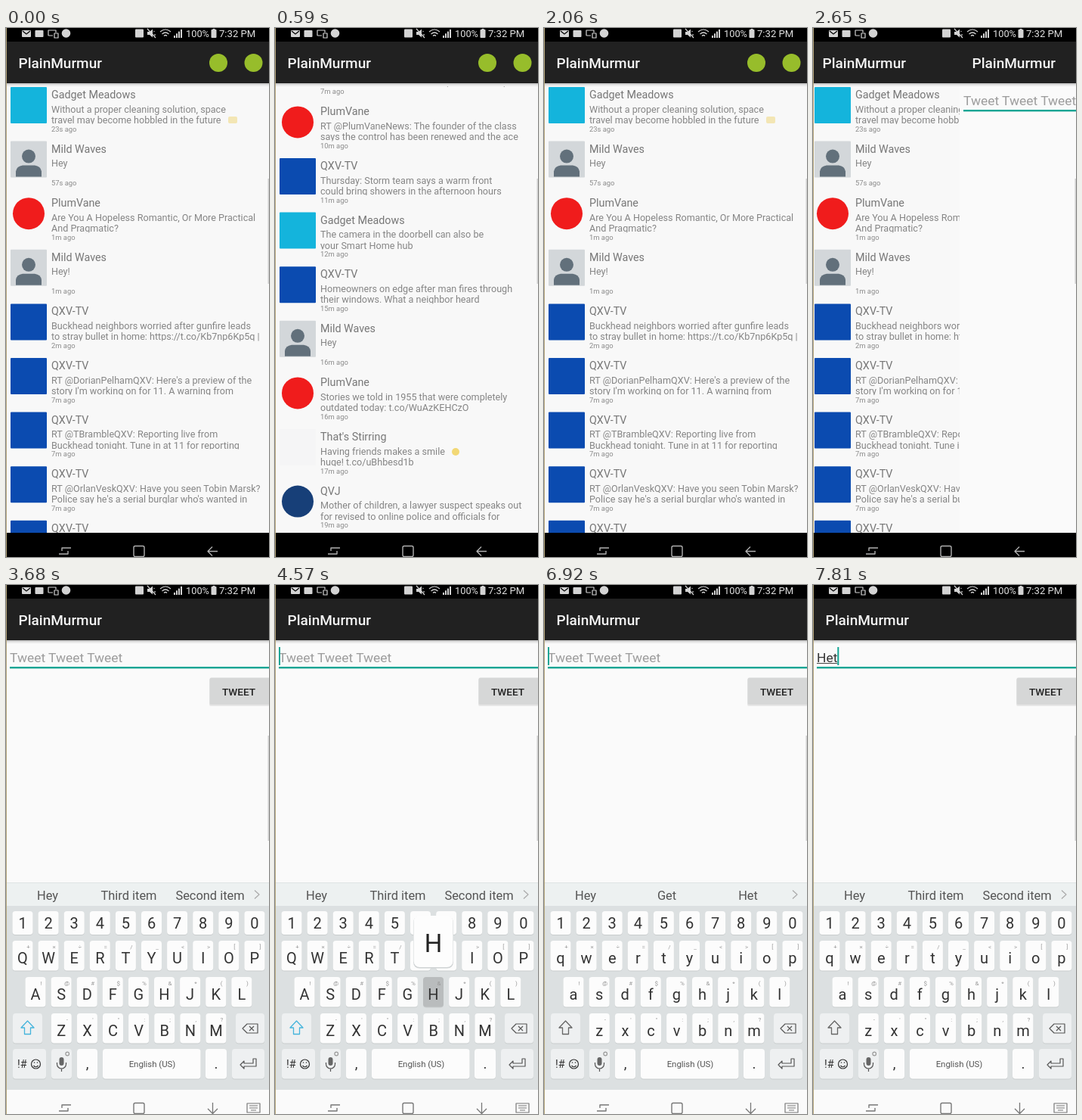
Animation, 348 px wide and 699 px high, one loop 8 s. Source, as an HTML page:

```html
<!DOCTYPE html>
<html lang="en">
<head>
<meta charset="utf-8">
<title>PlainMurmur</title>
<style>
html, body { margin: 0; width: 100%; height: 100%; overflow: hidden; background: #fafafa; }
svg { display: block; }
#stage { position: absolute; left: 0; top: 0; font-family: Roboto, sans-serif; }
</style>
</head>
<body>
<svg id="stage" width="348" height="699" viewBox="0 0 348 699"></svg>
<script>
const LOOP = 8000, STEP = 147.3, LAST = 53, PITCH = 71.6;
const TEAL = '#12a594';
const stage = document.getElementById('stage');
const pen = document.createElement('canvas').getContext('2d');
pen.font = '17.4px Roboto, sans-serif';

// Sparse tables of [step, value]; a value holds until the next entry.
const scroll = [[0, 0], [1, 60], [2, 210], [3, 420], [4, 622], [5, 740], [6, 690], [7, 450], [8, 170], [9, 0]];
const slide = [[0, 348], [17, 325], [18, 194], [19, 52], [20, 8], [21, 0]];
const listShift = [[0, 0], [18, -4], [19, -14], [20, -20]];
const keysDrop = [[0, 306], [22, 190], [23, 56], [24, 0]];
const typed = [[0, ''], [32, 'H'], [34, 'He'], [36, 'Het'], [43, 'He'], [44, 'H'], [45, ''], [51, 'H'], [52, 'He'], [53, 'Het']];
const pressed = [[0, ''], [31, 'h'], [32, ''], [33, 'e'], [34, ''], [35, 't'], [36, ''], [41, 'del'], [47, ''], [50, 'h'], [51, 'e'], [52, 't'], [53, '']];
const caps = [[0, true], [32, false], [48, true], [51, false]];
const cursorOn = [[0, false], [21, true], [25, false], [28, true], [41, false], [43, true]];
const hints = ['Hey', 'Third item', 'Second item'];
const words = [[0, hints], [37, ['Hey', 'Get', 'Het']], [48, hints]];

const at = (table, step) => table.filter(e => e[0] <= step).pop()[1];

// Feed accounts: name, avatar kind, avatar colour
const gadget = ['Gadget Meadows', 'square', '#14b4dc'];
const calm = ['Mild Waves', 'person', '#d3d7da'];
const plum = ['PlumVane', 'circle', '#f01c1c'];
const news = ['QXV-TV', 'square', '#0b4bb0'];
const stir = ["That's Stirring", 'square', '#f5f5f6'];
const paper = ['QVJ', 'circle', '#173f78'];
const feed = [
  [gadget, '23s', 'Without a proper cleaning solution, space', 'travel may become hobbled in the future'],
  [calm, '57s', 'Hey'],
  [plum, '1m', 'Are You A Hopeless Romantic, Or More Practical', 'And Pragmatic?'],
  [calm, '1m', 'Hey!'],
  [news, '2m', 'Buckhead neighbors worried after gunfire leads', 'to stray bullet in home: https://t.co/Kb7np6Kp5q |'],
  [news, '7m', "RT @DorianPelhamQXV: Here's a preview of the", "story I'm working on for 11.  A warning from"],
  [news, '7m', 'RT @TBrambleQXV: Reporting live from', 'Buckhead tonight. Tune in at 11 for reporting'],
  [news, '7m', 'RT @OrlanVeskQXV: Have you seen Tobin Marsk?', "Police say he's a serial burglar who's wanted in"],
  [news, '7m', 'Neighbors say the road will be closed until', 'crews can clear the lanes early this morning'],
  [plum, '10m', 'RT @PlumVaneNews: The founder of the class', 'says the control has been renewed and the ace'],
  [news, '11m', 'Thursday: Storm team says a warm front', 'could bring showers in the afternoon hours'],
  [gadget, '12m', 'The camera in the doorbell can also be', 'your Smart Home hub'],
  [news, '15m', 'Homeowners on edge after man fires through', 'their windows. What a neighbor heard'],
  [calm, '16m', 'Hey'],
  [plum, '16m', 'Stories we told in 1955 that were completely', 'outdated today: t.co/WuAzKEHCzO'],
  [stir, '17m', 'Having friends makes a smile', 'huge! t.co/uBhbesd1b'],
  [paper, '19m', 'Mother of children, a lawyer suspect speaks out', 'for revised to online police and officials for'],
  [news, '21m', 'Drivers warned about long delays downtown', 'as crews repair the bridge this weekend'],
  [calm, '22m', 'Hey'],
  [gadget, '24m', 'This tiny lamp charges from the window and', 'lasts all night long'],
  [news, '26m', 'Schools open late after the overnight rain', 'and fallen trees on several streets'],
];

const esc = s => s.replace(/&/g, '&amp;').replace(/</g, '&lt;');
const text = (x, y, size, fill, s, more = '') =>
  `<text x="${x}" y="${y}" font-size="${size}" fill="${fill}" ${more}>${esc(s)}</text>`;
const mid = (x, y, size, fill, s, more = '') => text(x, y, size, fill, s, 'text-anchor="middle" ' + more);
const rect = (x, y, w, h, fill, r = 0) =>
  `<rect x="${x}" y="${y}" width="${w}" height="${h}" rx="${r}" fill="${fill}"/>`;
const circle = (x, y, r, fill) => `<circle cx="${x}" cy="${y}" r="${r}" fill="${fill}"/>`;
const line = (d, color, w = 1.2) =>
  `<path d="${d}" fill="none" stroke="${color}" stroke-width="${w}" stroke-linejoin="round"/>`;
const fillPath = (d, color) => `<path d="${d}" fill="${color}"/>`;
const group = (x, y, s) => `<g transform="translate(${x} ${y})">${s}</g>`;

function avatar([, kind, color], y) {
  if (kind === 'circle') return circle(30, y + 24, 21, color);
  const base = rect(6, y, 48, 48, color, 1);
  if (kind === 'square') return base;
  const ink = '#62707b';
  return base + circle(30, y + 20, 9, ink) + fillPath(`M13 ${y + 47}v-7q1-7 9-8h16q8 1 9 8v7z`, ink);
}

function feedRow([who, age, first, second = ''], i) {
  const y = 78 + i * PITCH;
  const body = text(0, 13.5, 12.6, '#858585', first) + text(0, 28, 12.6, '#858585', second);
  const emoji = i === 0 ? rect(294, y + 39, 12, 9, '#f3e6b4', 2) : i === 15 ? circle(239, y + 30, 5, '#f2d875') : '';
  return avatar(who, y) + text(60, y + 15, 14.3, '#777', who[0]) +
    `<svg x="60" y="${y + 20}" width="277" height="29">${body}</svg>` + emoji +
    text(60, y + 58.5, 9.4, '#8a8a8a', age + ' ago');
}

const toolbar = () => rect(0, 18, 348, 55, '#212121') +
  rect(0, 73, 348, 2, '#cfcfcf') + rect(0, 75, 348, 2, '#ebebeb') +
  text(16.5, 53, 19, '#f5f5f5', 'PlainMurmur', 'font-weight="500"');

function listScreen(offset) {
  const rows = feed.map(feedRow).filter((_, i) => {
    const y = 78 + i * PITCH - offset;
    return y > 0 && y < 690;
  });
  return rect(0, 18, 348, 650, '#f8f8f8') + group(0, -offset, rows.join('')) + toolbar() +
    circle(281, 46, 12, '#97bd2b') + circle(327.5, 46, 12, '#97bd2b');
}

function composeScreen(value, showCursor) {
  const width = pen.measureText(value).width;
  const entry = value
    ? text(5, 101.5, 17.4, '#333', value) + rect(5, 103, width, 1, '#444')
    : text(5, 101.5, 17.4, '#9c9c9c', 'Tweet Tweet Tweet');
  return rect(0, 18, 348, 681, '#fafafa') + toolbar() + entry +
    rect(5, 108, 343, 2.4, TEAL) + (showCursor ? rect(5 + width, 82, 2, 24, TEAL) : '') +
    rect(269, 124, 80, 36, '#e6e6e6', 2) + rect(269.5, 122.5, 80, 35.5, '#d6d7d7', 2) +
    mid(308, 145.5, 13.6, '#222', 'TWEET', 'font-weight="500"');
}

const letterRows = [
  ['qwertyuiop', 22, 470, '+×÷=/_<>[]'],
  ['asdfghjkl', 39, 518, '!@#$%&*()'],
  ['zxcvbnm', 73.3, 566, '-\'":;,?'],
];

function keyboard(upper, down, bar) {
  const ink = '#333', soft = '#eef0f1', white = '#fcfcfc', dim = '#9a9a9a';
  const key = (x, y, w, h, fill) => rect(x, y + 1, w, h, '#c9cdce', 4) + rect(x, y, w, h, fill, 4);
  let s = rect(0, 393, 348, 32, '#edf1f1') + rect(0, 393, 348, 1, '#dfe3e3') + rect(0, 424, 348, 245, '#dce0e1');
  let popup = '';
  bar.forEach((w, i) => { s += mid(55 + i * 107.5, 415.5, 16.4, '#555', w); });
  s += line('M329 403.5l6 5.5-6 5.5', '#aaa');
  [...'1234567890'].forEach((c, i) => {
    const x = 22 + 34.1 * i;
    s += key(x - 13.5, 431, 27, 31, white) + mid(x, 454, 20, ink, c);
  });
  for (const [letters, x0, y, marks] of letterRows) {
    [...letters].forEach((c, i) => {
      const x = x0 + 34.1 * i, glyph = upper ? c.toUpperCase() : c;
      s += key(x - 13.5, y, 27, 39.5, c === down ? '#b9bcbd' : white) +
        mid(x, y + 30, 20, ink, glyph) + mid(x + 7.5, y + 11, 8, dim, marks[i]);
      if (c === down) popup = rect(x - 26.5, y - 80, 53, 68.5, '#cfd3d4', 8) + rect(x - 26, y - 81, 52, 68, '#fdfdfd', 8) +
        mid(x, y - 33, 33, '#222', glyph);
    });
  }
  s += key(9, 566, 39, 39.5, soft) + line('M28.5 576l8.5 9h-4.5v8.5h-8V585H20z', upper ? '#45b4dc' : '#666', 1.3);
  s += key(304, 566, 38, 39.5, down === 'del' ? '#b9bcbd' : soft) +
    line('M313 586l6-6h14v12h-14zM322 583l6 6M328 583l-6 6', '#555');
  s += key(9, 613, 44, 39.5, soft) + text(15, 638, 14.5, ink, '!#') +
    line('M45.5 633a6 6 0 1 1-12 0a6 6 0 1 1 12 0M36.5 635q3 3.5 6 0', ink) + circle(37.5, 631, .8, ink) + circle(41.5, 631, .8, ink);
  s += key(60, 613, 27, 39.5, soft) + rect(70.5, 624, 6, 11, '#666', 3) +
    line('M67.5 631v2a6 6 0 0 0 12 0v-2M73.5 639v4', '#555') + line('M83.5 619.5a2.3 2.3 0 1 1-4.6 0a2.3 2.3 0 1 1 4.6 0', dim);
  s += key(94, 613, 27, 39.5, white) + mid(107.5, 639, 19, ink, ',');
  s += key(128, 613, 129.5, 39.5, white) + mid(193.5, 637, 11.4, '#555', 'English (US)');
  s += key(264, 613, 28, 39.5, white) + mid(278, 639, 19, ink, '.');
  s += key(299, 613, 43, 39.5, soft) + line('M315 629l-5 5 5 5v-3h16v-10h-4v6h-12z', '#555');
  return s + popup;
}

function statusBar() {
  const c = '#d4d4d4';
  return rect(0, 0, 348, 18, '#000') +
    rect(21, 3, 12, 9, c, 1) + line('M22 4l5 4 5-4', '#000') + rect(38.5, 3, 11, 9, c, 1) +
    line('M56 10V3h10v3M56 10h6M64 7h5v6h-5z', c) + circle(79.5, 7, 5.8, c) +
    rect(171, 1.5, 11, 11, c, 1) +
    fillPath('M187 5h3l4-3.5v11L190 9h-3z', c) + line('M187 1l11 12M196 4v1M197 8v2', c) +
    line('M204 5q7-6 14 0M206.5 8q4.5-4 9 0M209 10.5q2-2 4 0', c) +
    [0, 1, 2, 3].map(i => rect(222 + 3 * i, 10 - 2.7 * i, 2, 3 + 2.7 * i, c)).join('') +
    text(238, 12, 12.8, '#e2e2e2', '100%') + rect(273.5, 1, 3, 2, c) + rect(271.5, 2, 7, 11, c, 1) +
    text(282, 12, 13.1, '#e2e2e2', '7:32 PM');
}

function navBar(light) {
  const c = light ? '#777' : '#b0b0b0';
  return rect(0, 667, 348, 32, light ? '#fafafa' : '#000') +
    line('M86 687H74v4M70 695h12v-4', c, 1.4) +
    line('M171 684.5h10q2 0 2 2v10q0 2-2 2h-10q-2 0-2-2v-10q0-2 2-2z', c, 1.4) +
    (light
      ? line('M273.5 684v14M267 692l6.5 6.5 6.5-6.5', c, 1.3) +
        line('M319 685h17v12h-17zM322 688h11M322 691h11M324 694h7', c)
      : line('M280 691.5h-13M273 685.5l-6 6 6 6', c, 1.3));
}

function render(step) {
  const x = at(slide, step), drop = at(keysDrop, step), open = drop < 306;
  let s = '';
  if (x > 0) s += group(at(listShift, step), 0, listScreen(at(scroll, step)));
  if (x < 348) s += group(x, 0, composeScreen(at(typed, step), at(cursorOn, step)));
  if (open) s += group(0, drop, keyboard(at(caps, step), at(pressed, step), at(words, step)));
  s += navBar(open) + statusBar() + rect(346.5, 199, 1.5, 139, '#cfcfcf') + rect(0, 0, 1, 699, '#b5a67c');
  stage.innerHTML = s;
}

const start = performance.now();
let shown = -1;
function tick() {
  const t = (performance.now() - start) % LOOP;
  const step = Math.min(LAST, Math.floor((t + 5) / STEP));
  if (step !== shown) render(shown = step);
  requestAnimationFrame(tick);
}
tick();
</script>
</body>
</html>
```
